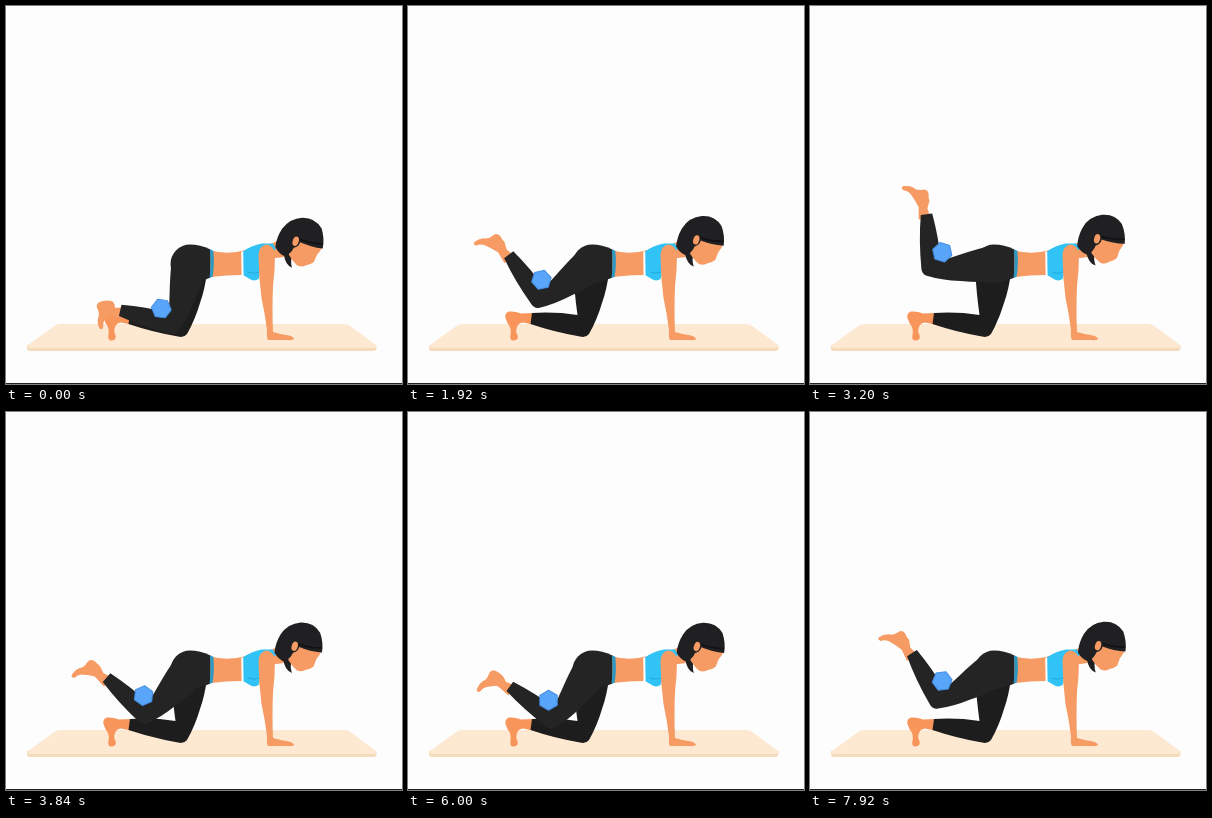
Write an HTML page that moves like this. It is 396 px wide and 378 px high and loops after 8 s.

```html
<!DOCTYPE html>
<html lang="en">
<head>
<meta charset="utf-8">
<title>Donkey kick</title>
<style>
  html, body { margin: 0; width: 100%; height: 100%; overflow: hidden; background: #fdfdfd; }
  svg { display: block; width: 100vw; height: 100vh; }
  .skin { fill: #f69b63; }
  .sole { fill: #f8955a; }
  .wear { fill: #242424; }
  .far { fill: #1d1d1d; }
  .top { fill: #31c3f6; }
  .hair { fill: #202022; }
</style>
</head>
<body>
<svg viewBox="0 0 396 378">
  <!-- mat -->
  <path fill="#f4dbbc" d="M21 339 H370.500 V342 Q370.500 345 367 345 H24 Q21 345 21 342 Z"/>
  <path fill="#fde8d1" d="M54 318 H338 Q341 318 343.500 319.500 L370 339 Q371 342 367 342 H24 Q20 342 22 339 L49 319.500 Q51 318 54 318 Z"/>
  <rect y="377" width="396" height="1" fill="#222"/>

  <!-- supporting leg -->
  <path class="sole" d="M125 307 L113 307.500 Q107 305 101 305.500 Q96.500 307 97.500 312 Q99 317 101.500 320 Q103.500 324 102.500 329 Q101.500 333 104 334.500 Q108 335 109.500 332.500 Q110.500 330 108.500 327 Q107.500 323 110 319 Q111.500 316.500 115 316.500 L125 318.500 Z"/>
  <path class="far" d="M165 262 L201 266 Q199 283 194 297 Q189 314 181 328 Q178 332 172 330.500 Q146 326 122.500 318 L124 307 Q147 305.500 169.500 309 Q166.500 288 165 262 Z"/>

  <!-- torso -->
  <path class="skin" d="M204 244.500 Q222 249 240 244 L240 269 Q224 268.500 205 271 Z"/>
  <path class="skin" d="M254 241 Q266 238 273 234 L286 245 Q284 251 270 252 L258 252 Z"/>
  <path class="top" d="M237 245.500 Q245 239.500 256 237.500 L267 237.500 L270 243 L256 253 Q255 266 252.500 273 Q248 276 243 272.500 L237 269 Z"/>
  <path d="M242 266 Q247 268.500 253 266" stroke="#22a9d8" fill="none"/>
  <path d="M236.200 245.500 L236.600 269.800" stroke="#fff" stroke-width="2" fill="none"/>

  <g id="head">
    <path class="hair" d="M278 248 L287 248 Q284 255 286 262 Q279 259 278 248 Z"/>
    <path class="skin" d="M287 233 L298 229 L317 241 Q315 245 311 249.500 Q309.500 253 308 256.500 Q305 259 300 259.500 Q296 262 291 259.500 Q287 256 283 249 Z"/>
    <path class="hair" d="M279 250.500 Q273 248 269.500 241 Q271 231 276.500 223 Q284 212.500 297 212 Q310 212 316 223 Q319 233 317 243 Q305 241.500 294.500 236.500 Q293 241 288 242 Q285 248 279 250.500 Z"/>
    <path d="M293 233 Q304 238 317 238.500" fill="none" stroke="#111113" stroke-width="1.500"/>
    <ellipse class="skin" cx="290" cy="235.500" rx="3" ry="4.800" transform="rotate(20 290 235.500)"/>
  </g>

  <!-- supporting arm -->
  <path class="skin" d="M252.500 249 Q253 240 260 238.500 Q268 239 269 248 Q269 264 267 280 Q266 305 267 326 Q274 328 283 329.500 Q288 331 288 333 Q287 334.500 281 334 L262 334 Q260.500 332 261 324 Q259 308 255.500 292 Q252.500 270 252.500 249 Z"/>

  <!-- kicking leg -->
  <path class="wear" d="M164.500 258 A19.500 19.500 0 0 1 184 238.500 Q194 238.500 204.500 243.500 L204.500 271.500 Q196 275 184 277.500 A19.500 19.500 0 0 1 164.500 258 Z"/>
  <path d="M203.800 243.300 L207.300 244.800 Q208.800 259 206.500 271 L203.500 271.600 Q205.500 258 203.800 243.300 Z" fill="#2d98c2"/>
  <g id="leg">
    <!-- foot drawn in the raised pose, then turned back to the resting one -->
    <g class="skin" transform="rotate(-88.500 184 258)">
      <path d="M118.500 200 L120.500 189 Q121 182 126 177 Q133 177 132.500 184 L129 191 L130.500 200 Z"/>
      <path id="foot" d="M133 176 Q132.500 171.500 128 171.500 Q122 171.500 119 167.500 Q115 164.500 109 164.500 Q106.500 166 109 168.500 Q113 169.500 115 173 Q118 179 120.500 187 Q124 190 128 188 Q133 182 133 176 Z"/>
    </g>
    <path class="wear" d="M165.500 256 Q175 242 195 248 L201 262 Q199 278 193.500 294 Q188.500 313 180.500 327 Q177.500 331 172 329.800 Q145 326.500 120.500 319 L121.500 307.500 Q146 306.500 169 309 Q169 300 167.500 288 Q165.500 270 165.500 256 Z"/>
    <path d="M171.500 306 L166.500 314.700 H156.500 L151.500 306 L156.500 297.300 H166.500 Z" fill="#58a5f9" stroke="#438fe6" stroke-linejoin="round"/>
  </g>
</svg>
<script>
  const LOOP = 8000, CYCLE = 4320;
  const LIFT = 980, PEAK = 2780, REST = 4660;
  const [head, leg, foot] = ["head", "leg", "foot"].map(id => document.getElementById(id));

  const smooth = (a, b, x) => {
    const u = Math.min(1, Math.max(0, (x - a) / (b - a)));
    return u * u * (3 - 2 * u);
  };

  // 0 = kneeling, 1 = leg fully raised
  function raise(time) {
    let t = time % CYCLE;
    if (t < REST - CYCLE) t += CYCLE;
    return t < PEAK ? smooth(LIFT, PEAK, t) : 1 - smooth(PEAK, REST, t);
  }

  function draw(time) {
    const p = raise(time);
    const angle = 89 * p;
    const flex = 36 * (1 - smooth(6, 48, angle));
    leg.setAttribute("transform", `rotate(${angle} 184 258)`);
    foot.setAttribute("transform", `rotate(${-flex} 130 177)`);
    head.setAttribute("transform", `translate(${-2.2 * p} ${-p}) rotate(${-6 * p} 270 245)`);
  }

  const start = performance.now();
  function tick() {
    draw((performance.now() - start) % LOOP);
    requestAnimationFrame(tick);
  }
  tick();
</script>
</body>
</html>
```
